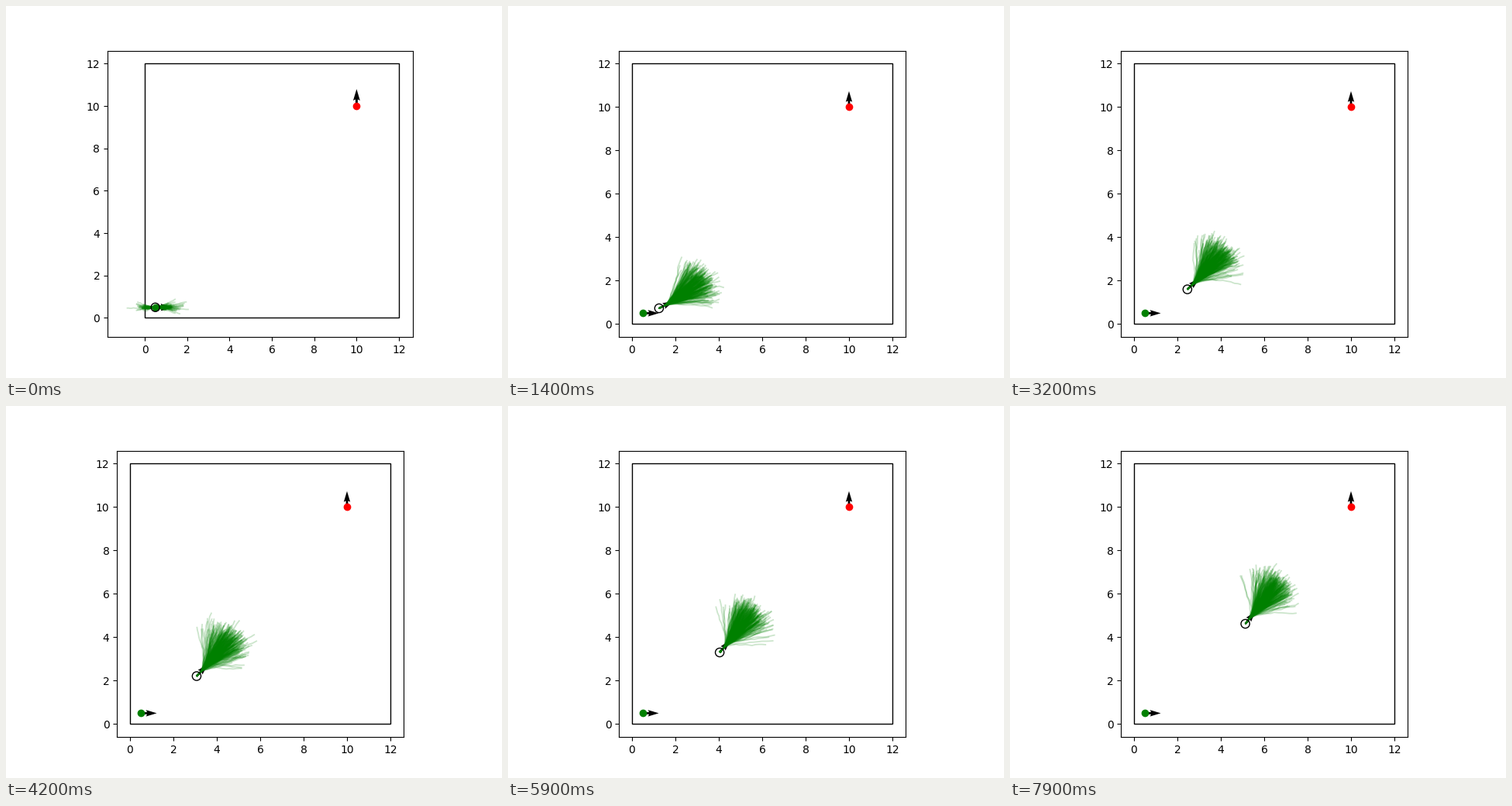
Write a matplotlib script that moves like this. It is 640 px wide and 480 px high and loops after 8 s.

```python
import numpy as np
import matplotlib.pyplot as plt
from matplotlib.animation import FuncAnimation
from matplotlib.collections import LineCollection
from matplotlib.patches import Circle, Rectangle

FRAMES, INTERVAL = 80, 100
SIZE = 12
START, GOAL = (0.5, 0.5), (10, 10)
SAMPLES, STEPS = 320, 15

# Robot way points: step, x, y, heading in degrees, speed per step, look-ahead turn
WAY = np.array([
    [0, 0.50, 0.50, 0.0, 0.000, 0],
    [8, 0.81, 0.56, 19.0, 0.075, 15],
    [21, 1.75, 1.00, 34.0, 0.083, 5],
    [32, 2.46, 1.60, 43.0, 0.086, 3],
    [42, 3.07, 2.21, 46.5, 0.086, 3],
    [59, 4.04, 3.30, 49.5, 0.086, 2],
    [79, 5.13, 4.62, 51.0, 0.086, 0],
])


def robot(k):
    """Position on a Hermite path, heading and look-ahead turn in radians."""
    i = min(np.searchsorted(WAY[:, 0], k, side="right") - 1, len(WAY) - 2)
    a, b = WAY[i], WAY[i + 1]
    span = b[0] - a[0]
    s = (k - a[0]) / span

    def tangent(w):
        h = np.radians(w[3])
        return w[4] * span * np.array([np.cos(h), np.sin(h)])

    pos = ((2 * s**3 - 3 * s**2 + 1) * a[1:3] + (s**3 - 2 * s**2 + s) * tangent(a)
           + (3 * s**2 - 2 * s**3) * b[1:3] + (s**3 - s**2) * tangent(b))
    heading, turn = (np.radians(np.interp(k, WAY[:, 0], WAY[:, c])) for c in (3, 5))
    return pos, heading, turn


def rollouts(k, pos, heading, turn):
    """Noisy predicted paths fanning out ahead of the robot."""
    rng = np.random.default_rng(100 + k)
    warm = min(1, k / 8)
    length = rng.normal(0.12 + 2.35 * warm, 0.55 - 0.31 * warm, (SAMPLES, 1))
    spread = np.radians(10 + 6 * warm)
    t = np.arange(STEPS)
    onset = 1 - np.exp(-np.maximum(t - 1, 0) / 1.8)
    angle = (heading + (turn + rng.normal(0, spread, (SAMPLES, 1))) * onset
             + rng.normal(0, np.radians(9), (SAMPLES, STEPS)) * onset)
    step = (length + rng.normal(0, 0.35, (SAMPLES, STEPS))) / STEPS
    moves = np.stack([step * np.cos(angle), step * np.sin(angle)], axis=2)
    paths = np.concatenate([np.zeros((SAMPLES, 1, 2)), moves.cumsum(axis=1)], axis=1)
    return pos + paths


def limits(low):
    pad = 0.05 * (SIZE - low)
    return low - pad, SIZE + pad


def arrow(x, y, angle):
    ax.quiver([x], [y], [np.cos(angle)], [np.sin(angle)], color="black")


def draw(k):
    ax.clear()
    pos, heading, turn = robot(k)

    ax.add_patch(Rectangle((0, 0), SIZE, SIZE, fill=False, lw=1))
    arrow(*START, 0)
    arrow(*GOAL, np.pi / 2)
    arrow(*pos, heading)
    ax.plot(*START, "o", color="green")
    ax.plot(*GOAL, "o", color="red")
    ax.add_collection(LineCollection(rollouts(k, pos, heading, turn), colors="green",
                                     alpha=0.2, linewidths=1.3, zorder=2.5))
    ax.add_patch(Circle(pos, 0.2, fill=False, lw=1, zorder=3))

    # The view is wider while early paths leave the arena
    ax.set_xlim(limits(-1.1 * max(0, 1 - k / 4)))
    ax.set_ylim(limits(-0.29 + 0.17 * k / 8 if k < 9 else 0))
    ax.set_aspect("equal", adjustable="box")


fig, ax = plt.subplots(figsize=(6.4, 4.8), dpi=100)
anim = FuncAnimation(fig, draw, frames=FRAMES, init_func=lambda: draw(0),
                     interval=INTERVAL, repeat=True, repeat_delay=0)
plt.show()
```
